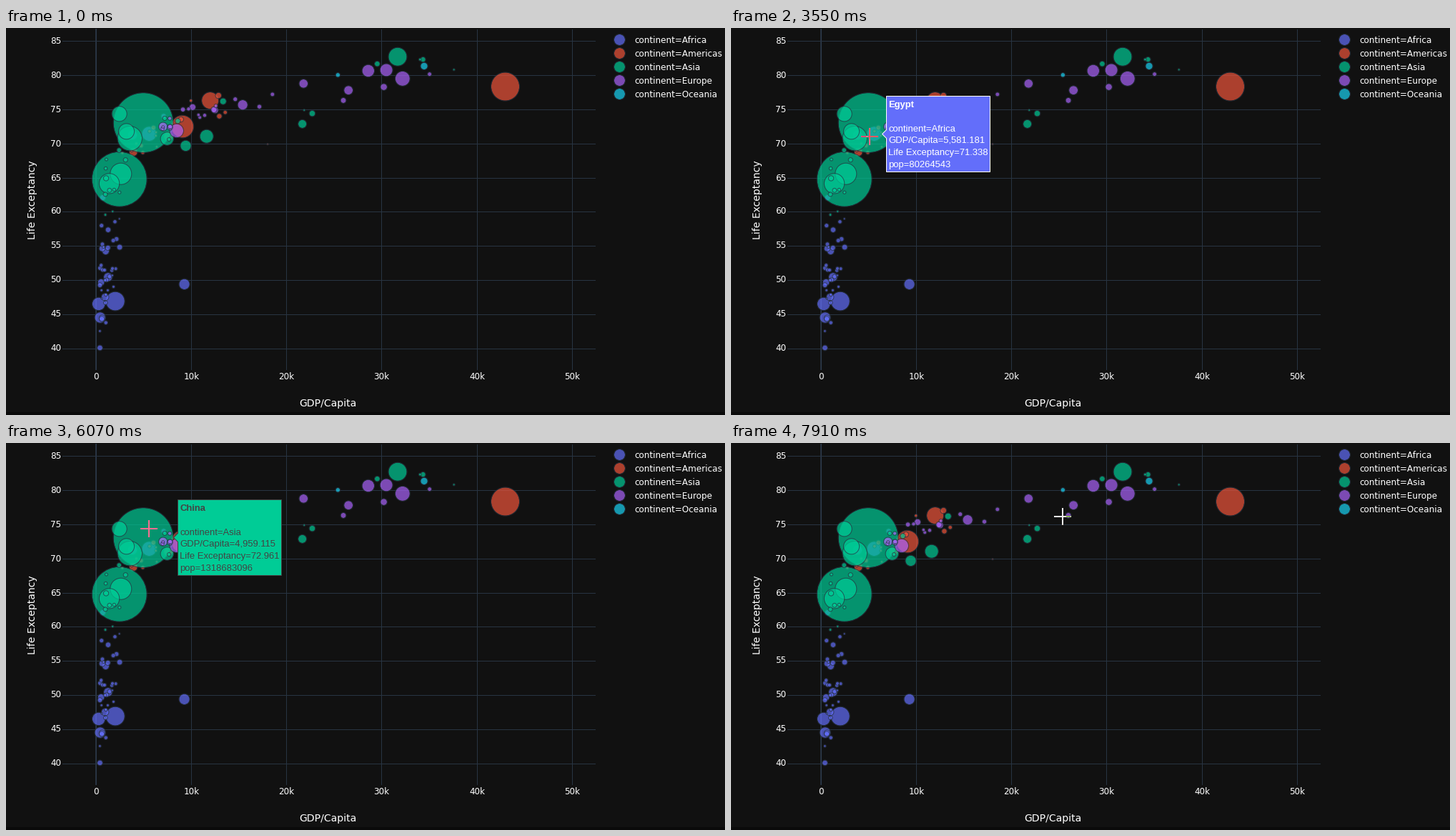
Write a matplotlib script that moves like this. It is 1006 px wide and 542 px high and loops after 8000 ms.

```python
import numpy as np
import matplotlib.pyplot as plt
from matplotlib.animation import FuncAnimation
from matplotlib.collections import PatchCollection
from matplotlib.patches import Circle, Polygon, Rectangle

W, H, DPI = 1006, 542, 100
PX = 72 / DPI
INTERVAL, LOOP, MOUSE_MS = 40, 8000, 75
BACK, GRID, INK = "#111111", "#283442", "white"
HOVER_LIMIT = 20
ARM = 12

COLORS = {"Africa": "#636efa", "Americas": "#ef553b", "Asia": "#00cc96",
          "Europe": "#ab63fa", "Oceania": "#19d3f3"}

# Large or visited countries: GDP per capita, life expectancy, population in millions
LANDMARKS = {
    "Africa": {
        "Morocco": (3820.175, 71.164, 33.757175),
        "Tunisia": (7092.923, 73.923, 10.276158),
        "Nigeria": (2013.977, 46.859, 135.031164),
        "Egypt": (5581.181, 71.338, 80.264543),
        "South Africa": (9269.658, 49.339, 43.997828),
        "Congo, Dem. Rep.": (277.552, 46.462, 64.606759),
    },
    "Americas": {
        "Dominican Republic": (6025.375, 72.235, 9.319622),
        "Mexico": (11977.57, 76.195, 108.700891),
        "Brazil": (9065.801, 72.39, 190.010647),
        "United States": (42951.65, 78.242, 301.139947),
        "Trinidad and Tobago": (18008.51, 69.819, 1.056608),
    },
    "Asia": {
        "China": (4959.115, 72.961, 1318.683096),
        "India": (2452.21, 64.698, 1110.396331),
        "Indonesia": (3540.652, 70.65, 223.547),
        "Pakistan": (2605.948, 65.483, 169.270617),
        "Bangladesh": (1391.254, 64.062, 150.448339),
        "Japan": (31656.07, 82.603, 127.467972),
        "Philippines": (3190.481, 71.688, 91.077287),
        "Vietnam": (2441.576, 74.249, 85.262356),
        "Thailand": (7458.396, 70.616, 65.068149),
        "Iran": (11605.71, 70.964, 69.45357),
        "Saudi Arabia": (21654.83, 72.777, 27.601038),
    },
    "Europe": {
        "Germany": (32170.37, 79.406, 82.400996),
        "Turkey": (8458.276, 71.777, 71.158647),
        "France": (30470.02, 80.657, 61.083916),
        "Italy": (28569.72, 80.546, 58.147733),
        "Poland": (15389.92, 75.563, 38.518241),
    },
    "Oceania": {"Australia": (34435.37, 81.235, 20.434176)},
}

# Smaller countries: count, GDP range, life at 10k, gain per e-fold of GDP, spread
CLOUDS = {
    "Africa": (40, 400, 2500, 51, 0, 5.5),
    "Americas": (19, 2700, 14000, 74, 4, 2),
    "Asia": (22, 900, 48000, 74, 5, 2.5),
    "Europe": (24, 6000, 42000, 73.8, 5, 0.9),
    "Oceania": (1, 25000, 26000, 75.3, 5, 0.1),
}

# Mouse moves: first and last update in ms, then where the cursor comes to rest
MOVES = [
    (120, 210, (751, 448)), (600, 670, (457, 322)), (980, 1220, (249, 183)),
    (1530, 1600, (203, 137)), (1680, 2310, (213, 124)), (2690, 2840, (219, 122)),
    (3240, 3790, (169, 183)), (3950, 4180, (181, 214)), (4340, 4340, (179, 211)),
    (4400, 4960, (176, 152)), (5270, 5270, (171, 148)), (5340, 5340, (168, 146)),
    (5510, 5660, (167, 129)), (5890, 6670, (288, 97)), (6750, 6750, (291, 97)),
    (6910, 6980, (295, 95)), (7140, 7450, (372, 163)), (7680, 7910, (464, 103)),
]
ENTRY = (843, 484)


def to_px(gdp, life):
    return 126 + gdp * 0.01333, 17.3 + (85 - life) * 9.578


def radius(pop):
    return 42 * np.sqrt(pop / 1318.683)


def cloud(rng, count, low, high, base, gain, spread):
    gdp = np.exp(rng.uniform(np.log(low), np.log(high), count))
    life = base + gain * np.log(gdp / 10000) + rng.normal(0, spread, count)
    pop = np.minimum(rng.lognormal(2, 0.9, count), 45)
    return list(zip(gdp, np.clip(life, 39.6, 82.2), pop))


def cursor_steps():
    """Straight moves, sampled at the pace of the mouse updates."""
    steps, here = [], np.array(ENTRY)
    for start, end, goal in MOVES:
        count = round((end - start) / MOUSE_MS) + 1
        for k in range(count):
            ms = start + (end - start) * k / max(count - 1, 1)
            x, y = np.rint(here + (np.array(goal) - here) * (k + 1) / count)
            steps.append((ms, int(x), int(y)))
        here = np.array(goal)
    return steps


def label(x, y, text, px=12, **kw):
    kw = {"family": "DejaVu Sans", "color": INK, "va": "baseline", **kw}
    return ax.text(x, y, text, fontsize=px * PX, **kw)


fig = plt.figure(figsize=(W / DPI, H / DPI), dpi=DPI, facecolor=BACK)
ax = fig.add_axes([0, 0, 1, 1])
ax.axis("off")

# Grid, ticks and titles
for i in range(10):
    y = int(17.5 + i * 47.89)
    ax.plot([79, 824], [y + 1] * 2, color=GRID, lw=PX, zorder=0)
    label(77, y + 4.5, str(85 - 5 * i), ha="right")
for i in range(6):
    x = int(126 + i * 133.3)
    ax.plot([x + 0.5 * (i > 0)] * 2, [2, 478], color=GRID,
            lw=PX * (1 if i else 2), zorder=0)
    label(x + 0.5, 492.5, f"{i}0k" if i else "0", ha="center")
label(450.5, 530, "GDP/Capita", 14, ha="center")
label(41, 240.5, "Life Exceptancy", 14, ha="center", rotation=90, rotation_mode="anchor")
ax.add_patch(Rectangle((0, 538), W, 4, color="#0a0a0a", lw=0))

# Bubbles: the fill stops where the outline starts, so translucency never doubles
patches, fills, edges, widths = [], [], [], []


def bubble(x, y, r, color):
    patches.extend([Circle((x, y), max(r - 0.5, 0.1)), Circle((x, y), r)])
    fills.extend([(color, 0.7), ("k", 0)])
    edges.extend([("k", 0), (GRID, 0.7)])
    widths.extend([0, PX])


rng = np.random.default_rng(7)
hoverable = []
for row, (continent, color) in enumerate(COLORS.items()):
    known = LANDMARKS[continent]
    countries = list(known.values()) + cloud(rng, *CLOUDS[continent])
    for gdp, life, pop in sorted(countries, key=lambda c: -c[2]):
        bubble(*to_px(gdp, life), radius(pop), color)
    for name, (gdp, life, pop) in known.items():
        hoverable.append((*to_px(gdp, life), radius(pop), name, continent, gdp, life, pop))
    bubble(858.5, 16.5 + 19 * row, 8, color)
    label(879, 21 + 19 * row, f"continent={continent}")
ax.add_collection(PatchCollection(
    patches, facecolors=fills, edgecolors=edges, linewidths=widths, zorder=2))

# Tooltip and cursor
box = ax.add_patch(Polygon([(0, 0), (1, 1), (1, 0)], lw=PX, zorder=5, visible=False))
lines = [label(0, 0, "", 13, family="Liberation Sans", zorder=6,
               weight="normal" if i else "bold") for i in range(5)]
cursor = ax.imshow(np.zeros((2 * ARM, 2 * ARM, 4)), aspect="auto",
                   interpolation="nearest", zorder=8, visible=False)
ax.set_xlim(0, W)
ax.set_ylim(H, 0)

# The cursor shows the inverted colours of what lies beneath it
fig.canvas.draw()
inverted = 255 - np.array(fig.canvas.buffer_rgba())[..., :3]
cross = np.zeros((2 * ARM, 2 * ARM, 1), np.uint8)
cross[ARM - 1:ARM + 1] = cross[:, ARM - 1:ARM + 1] = 255
STEPS = cursor_steps()


def hovered(x, y):
    """Closest bubble; inside several bubbles the smallest one wins."""
    def distance(point):
        r = max(3, point[2])
        return max(np.hypot(point[0] - x, point[1] - y) - r, 1 - 3 / r)
    best = min(hoverable, key=distance)
    return best if distance(best) < HOVER_LIMIT else None


def gdp_text(gdp):
    if gdp >= 10000:
        return f"{gdp / 1000:.5f}k"
    return f"{gdp:,.3f}".rstrip("0").rstrip(".")


def show_tooltip(point):
    for artist in (box, *lines):
        artist.set_visible(point is not None)
    if point is None:
        return
    x, y, r, name, continent, gdp, life, pop = point
    left, top = round(x + r + 6) + 0.5, round(y - 53.2) + 0.5
    right, bottom, mid = left + 145, top + 106, top + 53
    ink = "white" if continent == "Africa" else "#444444"
    box.set_xy([(left - 6, mid), (left, mid - 6), (left, top), (right, top),
                (right, bottom), (left, bottom), (left, mid + 6)])
    box.set_facecolor(COLORS[continent])
    box.set_edgecolor(ink)
    texts = [name, f"continent={continent}", f"GDP/Capita={gdp_text(gdp)}",
             f"Life Exceptancy={life:g}", f"pop={round(pop * 1e6)}"]
    for line, row, text in zip(lines, (0, 2, 3, 4, 5), texts):
        line.set_text(text)
        line.set_position((left + 3, top + 15.3 + 16.9 * row))
        line.set_color(ink)


def update(i):
    ms = i * INTERVAL + 30
    past = [step for step in STEPS if step[0] <= ms]
    cursor.set_visible(bool(past))
    show_tooltip(None)
    if past:
        _, x, y = past[-1]
        tile = inverted[y - ARM:y + ARM, x - ARM:x + ARM]
        cursor.set_data(np.concatenate([tile, cross], axis=2))
        cursor.set_extent((x - ARM, x + ARM, y + ARM, y - ARM))
        show_tooltip(hovered(x + 0.5, y + 0.5))
    return [box, cursor, *lines]


anim = FuncAnimation(fig, update, frames=LOOP // INTERVAL, interval=INTERVAL,
                     repeat=True, repeat_delay=0, blit=False)
plt.show()
```
